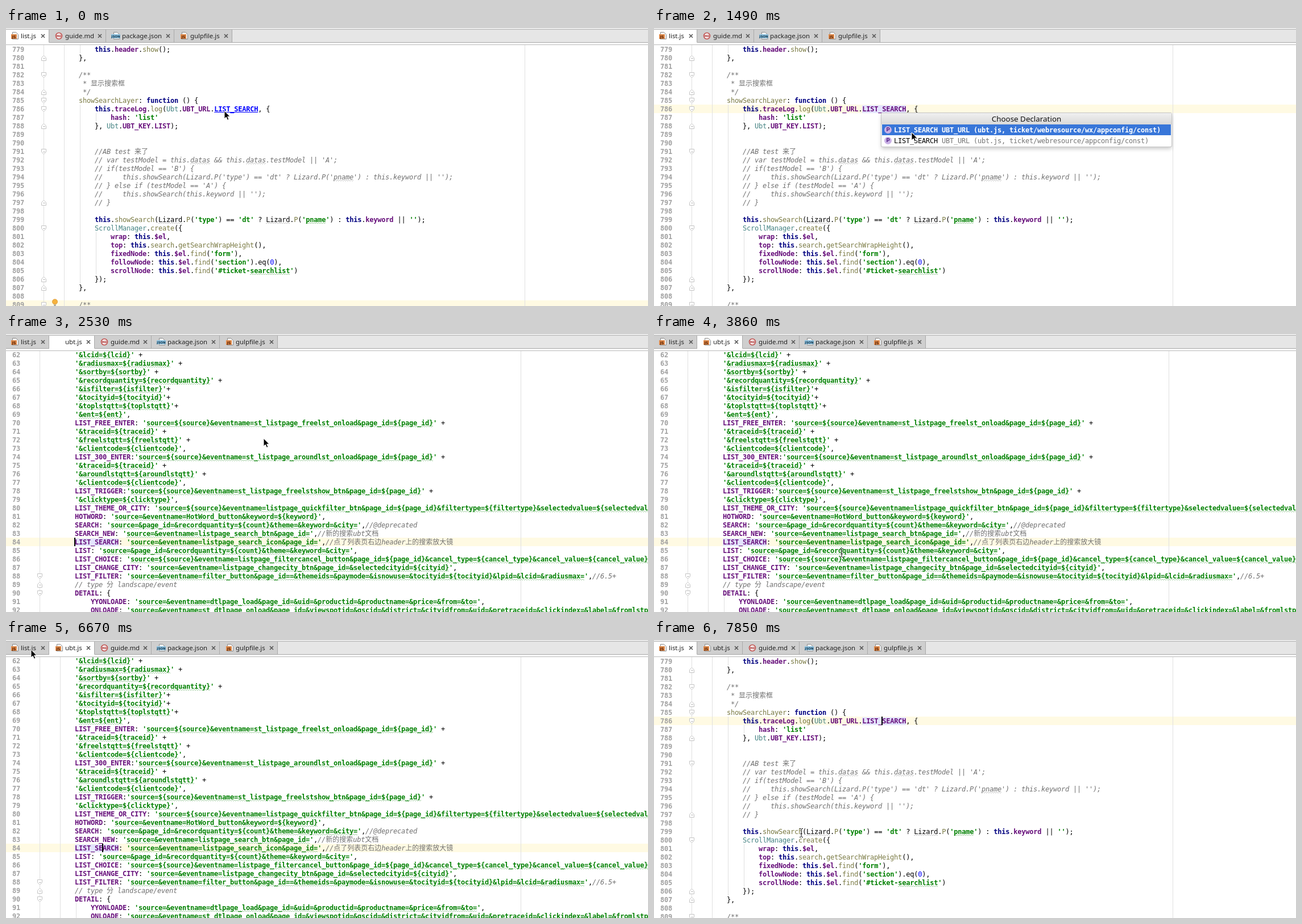
An HTML page that plays this animation: 1129x490 px, repeating every 7990 ms.

```html
<!DOCTYPE html>
<html lang="en">
<head>
<meta charset="utf-8">
<title>Editor: go to declaration</title>
<style>
html, body { margin: 0; width: 100%; height: 100%; overflow: hidden; background: #fff; }
#stage { position: relative; width: 1129px; height: 490px; overflow: hidden; background: #fff; }
#stage div, #stage svg, .abs { position: absolute; }
[hidden] { display: none !important; }
.mono { font: 12px/17px "DejaVu Sans Mono", monospace; letter-spacing: var(--gap, 0); white-space: pre; }
.view { left: 0; top: 30px; width: 1129px; height: 460px; overflow: hidden; }
.row { height: 15px; color: #000; }
.num { left: 11px; color: #a0a0a0; font-weight: bold; }
.line { width: 1px; background: #e0e0e0; }
.hl { left: 0; width: 1129px; height: 15px; background: #fffae3; }
.caret { width: 2px; height: 15px; background: #000; }
.k { color: #000080; font-weight: bold; }
.s { color: #008000; font-weight: bold; }
.p { color: #660e7a; font-weight: bold; }
.f { color: #7a7a43; }
.t { color: #458383; }
.n { color: #00f; }
.c { color: #707070; font-style: italic; }
.cjk { font-family: "Noto Sans CJK SC", "Noto Sans CJK", sans-serif; font-style: normal; letter-spacing: 0; line-height: 0; }
.w { --c: #a4cfa4; background:
  linear-gradient(90deg, var(--c) 50%, transparent 0) 0 100% / 4px 1px repeat-x,
  linear-gradient(90deg, var(--c) 50%, transparent 0) 2px calc(100% - 1px) / 4px 1px repeat-x; }
.g { --c: #c8c8c8; }
.decl { background: #e4e4ff; }
.link .decl { background: none; color: #00f; text-decoration: underline; }
#bar { left: 0; top: 0; width: 1129px; height: 30px; background: #e6e6e6; }
#bar .edge { left: 0; width: 1129px; }
#tabs { left: -2px; top: 3px; height: 23px; display: flex; }
#tabs .tab { position: relative; box-sizing: border-box; height: 23px; flex: none;
  background: #cfcfcf; border-right: 1px solid #aaa; border-bottom: 1px solid #a8a8a8;
  font: 11.4px/22px "Noto Sans", sans-serif; color: #222; }
#tabs .tab.active { background: #fff; border-bottom-color: #fff; }
.tab .abs { left: 28px; }
.tab svg { top: 0; left: 0; overflow: visible; }
#popup { left: 400px; top: 150px; width: 510px; height: 59px; background: #fff;
  box-shadow: 0 0 0 1px #c4c4c4, 0 4px 7px rgba(0,0,0,.22); border-radius: 2px; overflow: visible; }
#popup .head { left: 0; top: 0; width: 510px; height: 20px; text-align: center; color: #111;
  font: 13.4px/20px "Noto Sans", sans-serif; background: linear-gradient(#f0f0f0, #d9d9d9); }
#popup .item { left: 1px; width: 508px; height: 19px; line-height: 21px; }
#popup .item .abs { left: 21px; }
#popup .pick { background: #3876d9; color: #fff; font-weight: bold; }
#popup .dim { color: #747474; }
#popup .badge { left: 4px; top: 3px; width: 13px; height: 13px; border-radius: 50%; background: #c9b1e6;
  color: #5b2b8c; font: bold 9px/13px "DejaVu Sans", sans-serif; text-align: center; letter-spacing: 0; }
</style>
</head>
<body>
<div id="stage"></div>

<script type="text/plain" id="listCode">
        this.header.show();
    },

    /**
     * 显示搜索框
     */
    showSearchLayer: function () {
        this.traceLog.log(Ubt.UBT_URL.LIST_SEARCH, {
            hash: 'list'
        }, Ubt.UBT_KEY.LIST);


        //AB test 来了
        // var testModel = this.datas && this.datas.testModel || 'A';
        // if(testModel == 'B') {
        //     this.showSearch(Lizard.P('type') == 'dt' ? Lizard.P('pname') : this.keyword || '');
        // } else if (testModel == 'A') {
        //     this.showSearch(this.keyword || '');
        // }

        this.showSearch(Lizard.P('type') == 'dt' ? Lizard.P('pname') : this.keyword || '');
        ScrollManager.create({
            wrap: this.$el,
            top: this.search.getSearchWrapHeight(),
            fixedNode: this.$el.find('form'),
            followNode: this.$el.find('section').eq(0),
            scrollNode: this.$el.find('#ticket-searchlist')
        });
    },

    /**
</script>
<script type="text/plain" id="ubtCode">
    '&lcid=${lcid}' +
    '&radiusmax=${radiusmax}' +
    '&sortby=${sortby}' +
    '&recordquantity=${recordquantity}' +
    '&isfilter=${isfilter}'+
    '&tocityid=${tocityid}'+
    '&toplstqtt=${toplstqtt}'+
    '&ent=${ent}',
    LIST_FREE_ENTER: 'source=${source}&eventname=st_listpage_freelst_onload&page_id=${page_id}' +
    '&traceid=${traceid}' +
    '&freelstqtt=${freelstqtt}' +
    '&clientcode=${clientcode}',
    LIST_300_ENTER:'source=${source}&eventname=st_listpage_aroundlst_onload&page_id=${page_id}' +
    '&traceid=${traceid}' +
    '&aroundlstqtt=${aroundlstqtt}' +
    '&clientcode=${clientcode}',
    LIST_TRIGGER:'source=${source}&eventname=st_listpage_freelstshow_btn&page_id=${page_id}' +
    '&clicktype=${clicktype}',
    LIST_THEME_OR_CITY: 'source=${source}&eventname=listpage_quickfilter_btn&page_id=${page_id}&filtertype=${filtertype}&selectedvalue=${selectedvalue}',
    HOTWORD: 'source=&eventname=HotWord_button&keyword=${keyword}',
    SEARCH: 'source=&page_id=&recordquantity=${count}&theme=&keyword=&city=',//@deprecated
    SEARCH_NEW: 'source=&eventname=listpage_search_btn&page_id=',//新的搜索ubt文档
    LIST_SEARCH: 'source=&eventname=listpage_search_icon&page_id=',//点了列表页右边header上的搜索放大镜
    LIST: 'source=&page_id=&recordquantity=${count}&theme=&keyword=&city=',
    LIST_CHOICE: 'source=${source}&eventname=listpage_filtercancel_button&page_id=${page_id}&cancel_type=${cancel_type}&cancel_value=${cancel_value}',
    LIST_CHANGE_CITY: 'source=&eventname=listpage_changecity_btn&page_id=&selectedcityid=${cityid}',
    LIST_FILTER: 'source=&eventname=filter_button&page_id==&themeids=&paymode=&isnowuse=&tocityid=${tocityid}&lpid=&lcid=&radiusmax=',//6.5+
    // type 分 landscape/event
    DETAIL: {
        YYONLOADE: 'source=&eventname=dtlpage_load&page_id=&uid=&productid=&productname=&price=&from=&to=',
        ONLOADE: 'source=&eventname=st_dtlpage_onload&page_id=&viewspotid=&gscid=&district=&cityidfrom=&uid=&pretraceid=&clickindex=&label=&fromlstpage=',
</script>

<script>
const LOOP = 7990;
const stage = document.getElementById('stage');

function el(parent, cls, text = '', css = {}, tag = 'div') {
  const e = document.createElement(tag);
  e.className = cls;
  e.textContent = text;
  for (const k in css) e.style[k] = typeof css[k] === 'number' ? css[k] + 'px' : css[k];
  return parent.appendChild(e);
}
const span = (parent, cls, text) => el(parent, cls, text, {}, 'span');

function svg(parent, w, h, body) {
  parent.insertAdjacentHTML('beforeend', `<svg width="${w}" height="${h}">${body}</svg>`);
  return parent.lastElementChild;
}

// Fix the monospace advance at 7px however the browser rounds glyph widths.
const probe = span(stage, 'mono', 'M'.repeat(200));
const advance = probe.getBoundingClientRect().width / 200;
probe.remove();
stage.style.setProperty('--gap', (7 - advance).toFixed(4) + 'px');

// Syntax colouring
const TOKEN = /\/\/.*|\/\*\*|^ +\*.*|'[^']*'|\$?\w+|[^\w$'\/]+|./g;
const WORDS = [
  ['k', /^(this|function)$/],
  ['n', /^\d+$/],
  ['t', /^(Ubt|ScrollManager)$/],
  ['p', /^([A-Z][A-Z_\d]+|header|traceLog|keyword|hash|wrap|top|\w+Node|\$el)$/],
  ['f', /^(show\w*|log|create|find|search|getSearchWrapHeight|P)$/]
];
function kind(tok) {
  if (/^(\/\/|\/\*| +\*)/.test(tok)) return 'c';
  if (tok[0] === "'") return 's';
  const hit = WORDS.find(w => w[1].test(tok));
  return hit ? hit[0] : '';
}
function paint(row, text, wholeStrings) {
  for (const tok of text.match(TOKEN) || []) {
    const type = kind(tok);
    const box = span(row, type, '');
    if (tok === 'LIST_SEARCH') box.classList.add('decl');
    if (tok === 'Lizard') box.classList.add('w', 'g');
    const typo = wholeStrings && type === 's' ? /([^']+)/ : /(datas|pname|searchlist)/;
    tok.split(typo).forEach((part, i) => {
      if (i % 2) span(box, type === 'c' ? 'w g' : 'w', part);
      else part.split(/([\u4e00-\u9fff]+)/).forEach((s, j) => s && span(box, j % 2 ? 'cjk' : '', s));
    });
  }
}

// One editor pane; y values inside are stage values.
function pane({ code, first, top, col0, foldX, margin, down, up, guides, wholeStrings }) {
  const view = el(stage, 'view');
  const body = el(view, '', '', { left: 0, top: -30 });
  const hl = el(body, 'hl');
  const rowY = n => top + 15 * (n - first);
  const vline = (x, a, b) => el(body, 'line', '', { left: x, top: a, height: b - a });
  vline(margin, 0, 490);
  vline(foldX, 0, 490);
  const guideEls = guides.map(g => vline(...g));
  const mark = (n, d) => {
    const m = svg(body, 10, 11, `<path d="${d}" fill="#fff" stroke="#c4c4c4"/><path d="M3 5.5h4" stroke="#bbb"/>`);
    m.style.left = foldX - 4 + 'px';
    m.style.top = rowY(n) + 3 + 'px';
  };
  down.forEach(n => mark(n, 'M.5 .5h8v5l-4 4-4-4z'));
  up.forEach(n => mark(n, 'M.5 9.5h8v-5l-4-4-4 4z'));
  document.getElementById(code).textContent.replace(/^\n|\n$/g, '').split('\n').forEach((text, i) => {
    const y = top + 15 * i;
    el(body, 'mono num', String(first + i), { top: y });
    paint(el(body, 'mono row', '', { left: col0, top: y }), text, wholeStrings);
  });
  return { view, body, hl, guideEls, caret: el(body, 'caret') };
}

const list = pane({
  code: 'listCode', first: 779, top: 30, col0: 100, foldX: 66, margin: 912,
  down: [782, 785, 786, 791, 800, 809], up: [780, 784, 788, 797, 806, 807],
  guides: [[102, 30, 490], [130, 30, 45], [130, 135, 450], [158, 150, 165], [158, 360, 435]]
});
const ubt = pane({
  code: 'ubtCode', first: 62, top: 29, col0: 93, foldX: 59, margin: 905, wholeStrings: true,
  down: [88, 90], up: [89], guides: [[95, 30, 490], [123, 464, 490]]
});
ubt.hl.style.top = ubt.caret.style.top = '359px';
list.caret.style.left = '400px';
list.caret.style.top = '135px';

const bulb = svg(list.body, 12, 14,
  '<circle cx="6" cy="5.5" r="4.5" fill="#f6b23c" stroke="#dfa040"/><path d="M4 11h4M4.5 12.5h3" stroke="#888"/>');
bulb.style.left = '80px';
bulb.style.top = '477px';

// Tab bar
const bar = el(stage, '');
bar.id = 'bar';
el(bar, 'edge', '', { top: 0, height: 2, background: '#ececec' });
el(bar, 'edge', '', { top: 2, height: 1, background: '#b2b2b2' });
el(bar, 'edge', '', { top: 25, height: 1, background: '#a8a8a8' });
el(bar, 'edge', '', { top: 26, height: 3, background: '#fff' });
el(bar, 'edge', '', { top: 29, height: 1, background: '#b8b8b8' });
const tabs = el(bar, '');
tabs.id = 'tabs';

const label = (x, y, size, fill, s) =>
  `<text x="${x}" y="${y}" font-family="DejaVu Sans, sans-serif" font-weight="bold" font-size="${size}" text-anchor="middle" fill="${fill}">${s}</text>`;
const page = '<path d="M13.5 4.5h6l4 4v8h-10z" fill="#f7f7f7" stroke="#8b8b8b"/>';
const ICONS = {
  js: page + '<rect x="11" y="8" width="10" height="8" fill="#e08a4a"/>' + label(16, 14.6, 6.5, '#5a2507', 'JS'),
  md: '<circle cx="17" cy="11" r="5.5" fill="#f6eded" stroke="#c0504d" stroke-width="1.5"/>' + label(17, 13, 5, '#a33', 'MD'),
  json: page + '<rect x="9" y="8" width="16" height="7" fill="#8fc1de"/>' + label(17, 13.6, 5.5, '#12384f', 'JSON')
};
function tab(name, width) {
  const t = el(tabs, 'tab', '', { width });
  const icon = svg(t, 28, 22, ICONS[name.split('.')[1]]);
  span(t, 'abs', name);
  svg(t, width, 22, `<path d="M${width - 14} 8l6 6m0-6l-6 6" stroke="#555" stroke-width="1.6"/>`);
  return { t, icon };
}
const listTab = tab('list.js', 78);
const ubtTab = tab('ubt.js', 80);
tab('guide.md', 100);
tab('package.json', 120);
tab('gulpfile.js', 102);

// Declaration chooser
const popup = el(stage, '');
popup.id = 'popup';
el(popup, 'head', 'Choose Declaration');
['wx/', ''].forEach((dir, i) => {
  const item = el(popup, 'mono item' + (i ? '' : ' pick'), '', { top: 20 + 19 * i });
  el(item, 'badge', 'P');
  const text = span(item, 'abs', 'LIST_SEARCH ');
  span(text, i ? 'dim' : '', `UBT_URL (ubt.js, ticket/webresource/${dir}appconfig/const)`);
});

// Pointers, placed by their hot spot
const arrow = svg(stage, 13, 19,
  '<path d="M1 1v14l3.2-3 2.3 5.2 2.4-1-2.3-5.1h4.3z" fill="#000" stroke="#fff" stroke-width="1"/>');
const BEAM = 'M2 1.5h2l1 1 1-1h2M2 16.5h2l1-1 1 1h2M5 2.5v13M3.5 10.5h3';
const beam = svg(stage, 10, 18,
  `<path d="${BEAM}" fill="none" stroke="#fff" stroke-width="2.4" opacity=".7"/>` +
  `<path d="${BEAM}" fill="none" stroke="#000"/>`);
for (const c of [arrow, beam]) c.style.left = c.style.top = '0';

// time, x, y of each pointer step
const PATH = [
  [0, 384, 146], [150, 386, 146], [300, 392, 145], [450, 398, 144], [600, 399, 144],
  [1190, 415, 156], [1340, 440, 174], [1490, 453, 184],
  [3420, 500, 245], [3570, 553, 330], [3720, 470, 378], [3860, 330, 386], [4010, 215, 385],
  [4150, 175, 379], [4750, 171, 371],
  [5190, 171, 370], [5340, 168, 342], [5490, 158, 288], [5640, 145, 226], [5780, 124, 162],
  [5930, 100, 107], [6080, 80, 67], [6220, 69, 46], [6370, 57, 30], [6520, 47, 20], [6670, 44, 17],
  [6970, 52, 34], [7120, 105, 120], [7260, 185, 235], [7410, 264, 328], [7550, 262, 336], [7700, 259, 340]
];
const within = (t, ...spans) => spans.some(([a, b]) => t >= a && t < b);

function draw(t) {
  const inUbt = within(t, [2380, 6820]);
  list.view.hidden = inUbt;
  ubt.view.hidden = !inUbt;
  listTab.t.classList.toggle('active', !inUbt);
  ubtTab.t.classList.toggle('active', inUbt);
  ubtTab.t.hidden = t < 2380;
  ubtTab.icon.style.visibility = t < 2680 ? 'hidden' : 'visible';

  list.view.classList.toggle('link', t < 1040);
  list.hl.style.top = (t < 600 ? 480 : 135) + 'px';
  bulb.style.display = t < 600 ? '' : 'none';
  list.caret.hidden = !within(t, [6820, 7260], [7700, LOOP]);
  popup.hidden = !within(t, [740, 2380]);

  ubt.guideEls.forEach(g => g.hidden = t < 2980);
  ubt.caret.style.left = (t < 4750 ? 120 : 169) + 'px';
  ubt.caret.hidden = within(t, [2980, 3420], [3860, 4150], [5640, 6080]);

  let step = PATH[0];
  for (const p of PATH) if (p[0] <= t) step = p;
  const text = within(t, [3420, 6370], [7120, LOOP]);
  arrow.style.display = text ? 'none' : '';
  beam.style.display = text ? '' : 'none';
  arrow.style.transform = `translate(${step[1] - 1}px, ${step[2] - 1}px)`;
  beam.style.transform = `translate(${step[1] - 5}px, ${step[2] - 9}px)`;
}

const start = performance.now();
function tick() {
  draw((performance.now() - start) % LOOP);
  requestAnimationFrame(tick);
}
draw(0);
requestAnimationFrame(tick);
</script>
</body>
</html>
```
